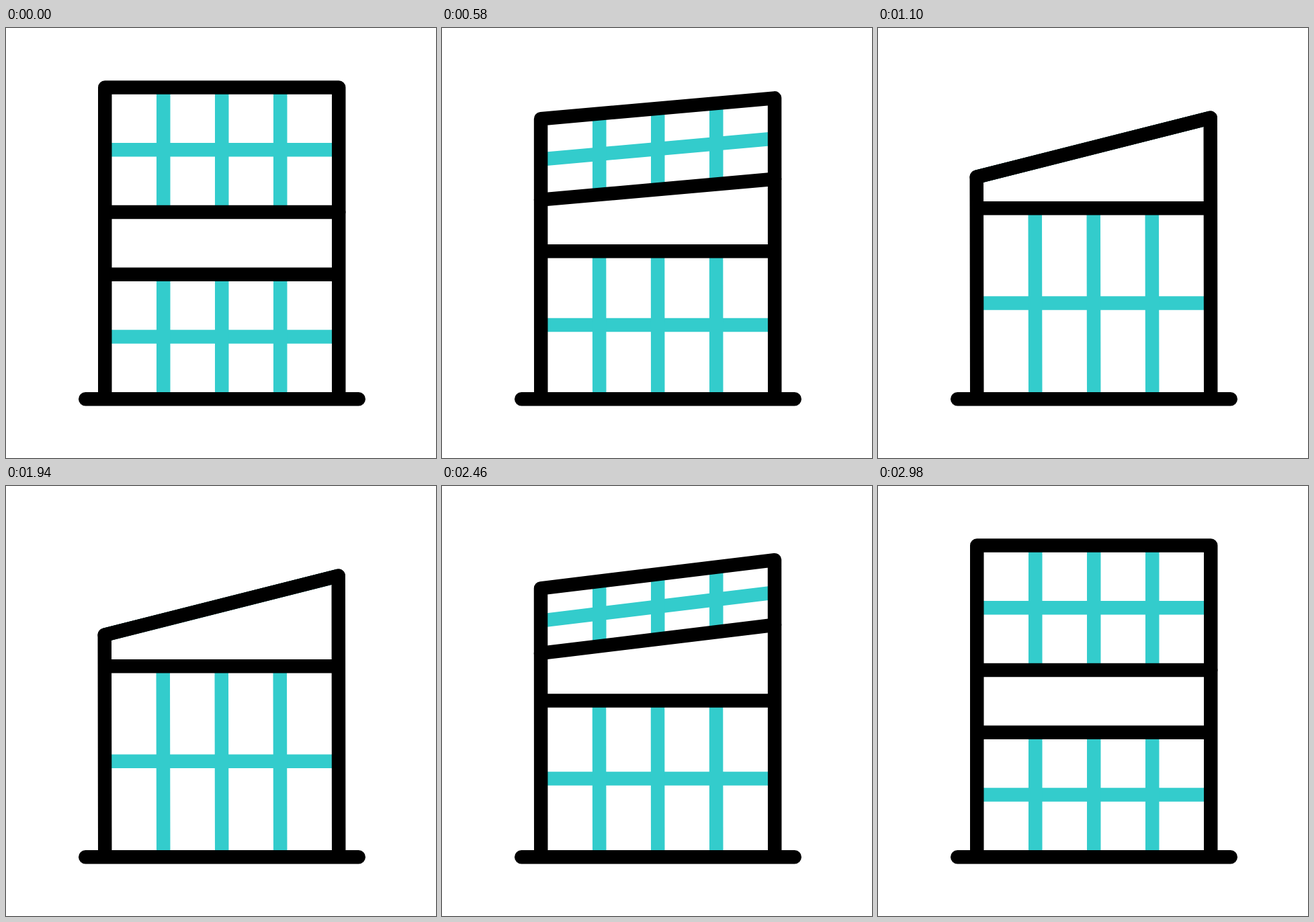
An HTML page for the animation above (3600 ms loop, 640 by 640 pixels).

```html
<!DOCTYPE html>
<html lang="en">
<head>
<meta charset="utf-8">
<title>Building</title>
<style>
  html, body { margin: 0; height: 100%; overflow: hidden; background: #fff; }
  svg { display: block; width: 100vw; height: 100vh; }
  path { fill: none; stroke: #000; stroke-width: 20.5; stroke-linejoin: round; }
  .teal { stroke: #3cc; }
  .round { stroke-linecap: round; }
  .fold {
    d: var(--tall);
    animation: fold 3600ms cubic-bezier(.5, 0, .5, 1) infinite;
  }

  /* shrink 200-1100 ms, hold, grow back 1920-2980 ms */
  @keyframes fold {
    0%, 5.5556% { d: var(--tall); }
    30.5556%, 53.3333% { d: var(--low); }
    82.7778%, 100% { d: var(--tall); }
  }

  #upper-bar {
    --tall: path("M147.25 181.25 L495.25 181.25");
    --low: path("M146.75 221.7 L494.75 133.7");
  }
  #upper-posts {
    --tall: path("M234.25 88.5 L234.25 274 M321.25 88.5 L321.25 274 M408.25 88.5 L408.25 274");
    --low: path("M234.25 199.7 L234.25 199.7 M321.25 177.7 L321.25 177.7 M408.25 155.7 L408.25 155.7");
  }
  #lower-bar {
    --tall: path("M147.25 459.5 L495.25 459.5");
    --low: path("M147.25 409.6 L495.25 409.6");
  }
  #lower-posts {
    --tall: path("M234.25 366.75 L234.25 552.25 M321.25 366.75 L321.25 552.25 M408.25 366.75 L408.25 552.25");
    --low: path("M233.75 268.25 L234.25 552.25 M320.75 268.25 L321.25 552.25 M407.75 268.25 L408.25 552.25");
  }
  #ledge {
    --tall: path("M147.25 274 L495.25 274");
    --low: path("M146.75 221.7 L494.75 133.7");
  }
  #sill {
    --tall: path("M147.25 366.75 L495.25 366.75");
    --low: path("M147.25 268.25 L495.25 268.25");
  }
  #frame {
    --tall: path("M147.25 552.25 L147.25 88.5 L495.25 88.5 L495.25 552.25");
    --low: path("M147.25 552.25 L146.75 221.7 L494.75 133.7 L495.25 552.25");
  }
</style>
</head>
<body>
<svg viewBox="0 0 640 640">
  <path id="upper-bar" class="fold teal"/>
  <path id="upper-posts" class="fold teal"/>
  <path id="lower-bar" class="fold teal"/>
  <path id="lower-posts" class="fold teal"/>
  <path id="ledge" class="fold round"/>
  <path id="sill" class="fold"/>
  <path id="frame" class="fold"/>
  <path class="round" d="M118.25 552.25H524.75"/>
</svg>
</body>
</html>
```
